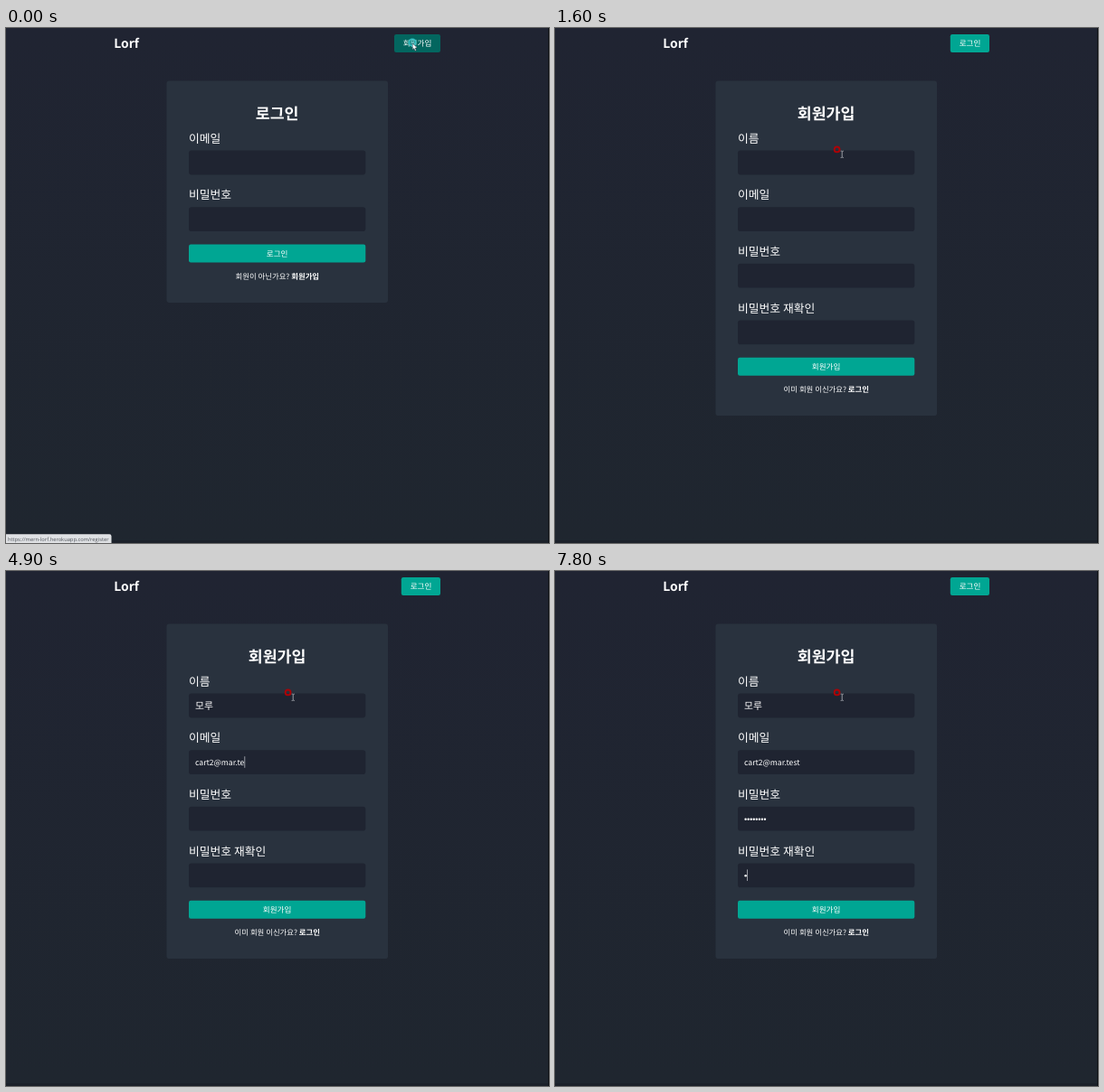
Write an HTML page that moves like this. It is 600 px wide and 570 px high and loops after 8000 ms.

```html
<!DOCTYPE html>
<html>
<head>
<meta charset="utf-8">
<style>
  html, body { margin: 0; width: 100%; height: 100%; overflow: hidden; background: #1f2531; }
  svg { display: block; font-family: "Noto Sans CJK KR", "Noto Sans CJK", sans-serif; text-rendering: geometricPrecision; }
  .ui { font-family: "Open Sans", sans-serif; }
</style>
</head>
<body>
<svg id="stage" width="600" height="570" viewBox="0 0 600 570"></svg>
<script>
const LOOP = 8000, STEP = 100;
const TEAL = '#00a693', HOVER = '#03665f', FIELD = '#1f2431';
const SITE = 'https://mern-lorf.herokuapp.com';
const MAIL = 'cart2@mar.test';

// Times of each key press, per field
const NAME = [[1700, 'ㅁ'], [1800, '모'], [2000, '몰'], [2100, '모루']];
const MAIL_KEYS = [3000, 3100, 3200, 3300, 3500, 3900, 4100, 4300, 4400, 4500, 4700, 4900, 5000, 5100];
const PASS_KEYS = [5800, 6000, 6300, 6500, 6700, 6900, 7100, 7300];
const AGAIN_KEYS = [7800];

const stage = document.getElementById('stage');
const pen = document.createElement('canvas').getContext('2d');
const count = (keys, t) => keys.filter(k => k <= t).length;
const fieldY = i => 135.6 + 62.6 * i;

const rect = (x, y, w, h, fill, r = 2.2) =>
  `<rect x="${x}" y="${y}" width="${w}" height="${h}" rx="${r}" fill="${fill}"/>`;

// Text placed by its vertical centre
const text = (s, x, cy, size, attrs = '') =>
  `<text x="${x}" y="${cy + size * 0.38}" font-size="${size}" fill="#fff" ${attrs}>${s}</text>`;
const centred = (s, x, cy, size, weight = 400) =>
  text(s, x, cy, size, `text-anchor="middle" font-weight="${weight}"`);

const caret = (x, i) => rect(x, fieldY(i) + 7, 0.7, 12.6, '#c9ccd1', 0);

function mailWidth(s) {
  pen.font = '100px "Noto Sans CJK KR", "Noto Sans CJK", sans-serif';
  return pen.measureText(s).width * 0.0867;
}

function dots(n, i) {
  let out = '';
  for (let k = 0; k < n; k++)
    out += `<circle cx="${210.6 + 3.05 * k}" cy="${fieldY(i) + 13.9}" r="1.2" fill="#fff"/>`;
  return out;
}

function form(title, labels, button, question, link) {
  const by = fieldY(labels.length - 1) + 41.3;
  return rect(177.5, 58.6, 244.5, by + 5.8, '#29323e', 2.8) +
    centred(title, 299.6, 94, 17.3, 700) +
    labels.map((s, i) => text(s, 202, 122 + 62.6 * i, 12.8) +
      rect(202, fieldY(i), 195.3, 26.8, FIELD, 2.8)).join('') +
    rect(202, by, 195.3, 20, TEAL) +
    centred(button, 299.6, by + 10, 8.6) +
    centred(`${question} <tspan font-weight="700">${link}</tspan>`, 299.8, by + 35, 8.4);
}

function values(t) {
  let out = '';
  const name = NAME[count(NAME.map(k => k[0]), t) - 1];
  if (name) out += text(name[1], 209, fieldY(0) + 13.4, 10.8, 'font-weight="300"');
  else if (t >= 1400 && t < 1600) out += caret(209, 0);

  const mail = MAIL.slice(0, count(MAIL_KEYS, t));
  out += text(mail, 209, fieldY(1) + 13.8, 8.67);
  if (t > 2800 && t < 5400) out += caret(209 + mailWidth(mail), 1);

  [PASS_KEYS, AGAIN_KEYS].forEach((keys, k) => {
    const n = count(keys, t), [from, to] = [[5400, 7500], [7500, LOOP]][k];
    out += dots(n, k + 2);
    if (t >= from && t < to) out += caret(209 + 3.05 * n, k + 2);
  });
  return out;
}

function status(url, width, alpha) {
  return `<g opacity="${alpha}">` + rect(-3, 560.3, width + 3, 13, '#dfe1e4') +
    `<text class="ui" x="2" y="567.7" font-size="5.75" fill="#50545a">${url}</text></g>`;
}

function pointer(t) {
  const p = Math.min(1, Math.max(0, (t - 200) / 400));
  const e = p * p * (3 - 2 * p);
  const settle = t >= 1100;
  const x = 449 - 138 * e + (settle ? 0.6 : 0);
  const y = 16 + 119 * e - (settle ? 0.6 : 0);
  const ring = t < 200
    ? `<circle r="3.8" fill="#2fb5b8" fill-opacity=".45" stroke="#35c3c4" stroke-width="1.5"/>`
    : `<circle r="2.9" fill="none" stroke="${settle ? '#ad0307' : '#c60206'}" stroke-width="1.9"/>`;
  const shape = t < 600
    ? `<path d="M.3 1v7l1.6-1.5 1.2 2.7 1.2-.5-1.2-2.6h2.2z" fill="#fff" stroke="#223" stroke-width=".4"/>`
    : `<path d="M4 1.8h1l.6.5.6-.5h1M5.6 2.3v6.2M4 9h1l.6-.5.6.5h1" fill="none" stroke="#b9bcc2" stroke-width=".8"/>`;
  return `<g transform="translate(${x} ${y})">${ring}${shape}</g>`;
}

function draw(t) {
  const login = t < 200, hover = t < 400;
  let out = `<defs><linearGradient id="bg" x2="0" y2="1"><stop stop-color="#202432"/>
    <stop offset="1" stop-color="#1f262f"/></linearGradient></defs>` +
    rect(0, 0, 600, 570, 'url(#bg)', 0) +
    rect(0, 567, 600, 3, '#1b2029', 0) + rect(599, 0, 1, 570, '#0c0f14', 0) +
    text('Lorf', 119.3, 17, 13.9, 'font-weight="700"');
  if (login) {
    out += rect(429, 7, 51, 20, HOVER) + centred('회원가입', 454.5, 17, 8.6) +
      form('로그인', ['이메일', '비밀번호'], '로그인', '회원이 아닌가요?', '회원가입') +
      status(SITE + '/register', 116.5, 1);
  } else {
    out += rect(436.8, 7, 43.2, 20, hover ? HOVER : TEAL) + centred('로그인', 458.5, 17, 8.6) +
      form('회원가입', ['이름', '이메일', '비밀번호', '비밀번호 재확인'],
        '회원가입', '이미 회원 이신가요?', '로그인') + values(t);
    const alpha = Math.min(1, (800 - t) / 300);
    if (alpha > 0) out += status(SITE, 94.5, alpha);
  }
  stage.innerHTML = out + pointer(t);
}

const start = performance.now();
let last = -1;
function tick() {
  const now = Math.max(0, performance.now() - start) % LOOP;
  const t = Math.floor(now / STEP) * STEP;
  if (t !== last) draw(last = t);
  requestAnimationFrame(tick);
}
tick();
</script>
</body>
</html>
```
